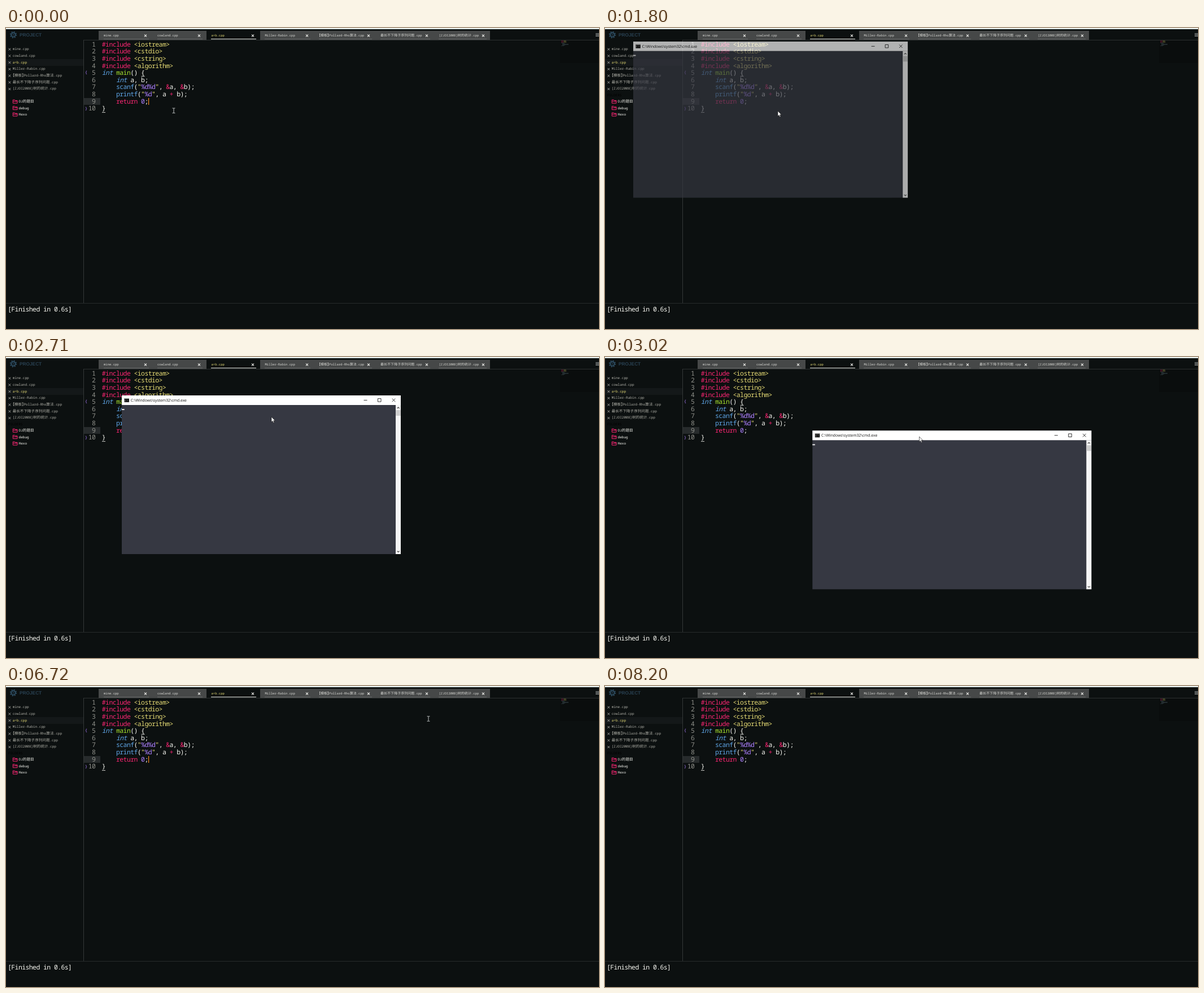
Write an HTML page that moves like this. It is 1050x533 px and loops after 8.3 s.

```html
<!DOCTYPE html>
<html lang="en">
<head>
<meta charset="utf-8">
<title>Editor and console</title>
<style>
html, body { margin: 0; width: 100%; height: 100%; overflow: hidden; background: #0c1010; }
svg { display: block; width: 1050px; height: 533px; }
text { white-space: pre; text-rendering: geometricPrecision; font-family: "Noto Sans Mono", "DejaVu Sans Mono", monospace; }
.cjk { font-family: "Noto Sans CJK SC", "Noto Sans CJK JP", sans-serif; font-feature-settings: "halt"; }
.code { font-size: 11.5px; font-weight: 500; letter-spacing: -.6px; }
.term { font-family: "Liberation Mono", monospace; }
.title { font-family: "Open Sans", "Noto Sans", sans-serif; }
.head { font-family: "Liberation Sans", sans-serif; font-weight: bold; }
</style>
</head>
<body>
<svg id="stage" viewBox="0 0 1050 533"></svg>
<script>
const LOOP = 8300;
const INK = { p: '#f92672', y: '#e6db74', b: '#5fa6e8', i: '#5fa6e8', g: '#a6e22e', w: '#f8f8f2', v: '#ae81ff' };

const esc = s => s.replace(/&/g, '&amp;').replace(/</g, '&lt;').replace(/>/g, '&gt;');
const rect = (x, y, w, h, fill, more = '') =>
  `<rect x="${x}" y="${y}" width="${w}" height="${h}" fill="${fill}" ${more}/>`;
const path = (d, stroke, width = 1, more = '') =>
  `<path d="${d}" fill="none" stroke="${stroke}" stroke-width="${width}" ${more}/>`;
const cross = (x, y, r, color, width) =>
  path(`M${x - r} ${y - r}l${2 * r} ${2 * r}m0 ${-2 * r}l${-2 * r} ${2 * r}`, color, width);

// Latin runs use the mono face, Chinese runs a slightly larger CJK face.
function label(x, y, str, size, fill, cls = '', ratio = 1.09) {
  const body = esc(str).replace(/[^\x00-\xff]+/g,
    run => `<tspan class="cjk" font-size="${size * ratio}">${run}</tspan>`);
  return `<text x="${x}" y="${y}" font-size="${size}" fill="${fill}" class="${cls}">${body}</text>`;
}

function topBar() {
  const tabs = [
    [173, 247, 'mine.cpp'], [268, 342, 'cowland.cpp'], [363.5, 437, 'a+b.cpp'],
    [458.5, 533, 'Miller-Rabin.cpp'], [554, 642, '【模板】Pollard-Rho算法.cpp'],
    [663, 745, '最长不下降子序列问题.cpp'], [766.5, 845, '[ZJOI2008]树的统计.cpp']
  ];
  return rect(0, 0, 1050, 2, '#eef5f3') + rect(0, 2, 1050, 1, '#1c2626') +
    rect(137, 21, 913, 1, '#2c3030') +
    rect(164, 5, 693, 16, '#464848') + rect(355, 4, 95, 17, '#0c1010') +
    tabs.map(([x, close, name], i) =>
      rect(Math.floor(x), 19, close + 6 - Math.floor(x), 1, i === 2 ? '#e8e8e4' : '#666868') +
      label(x, i < 4 ? 14.6 : 15.4, name, 5.55, i === 2 ? INK.y : '#d8d8d4') +
      cross(close, 13.6, 2, '#f0f0ec', 1.1)).join('') +
    path('M1044 10h6m-6 2.2h6m-6 2.2h6', '#a8acac', 1);
}

function sidebar() {
  const files = ['mine.cpp', 'cowland.cpp', 'a+b.cpp', 'Miller-Rabin.cpp',
    '【模板】Pollard-Rho算法.cpp', '最长不下降子序列问题.cpp', '[ZJOI2008]树的统计.cpp'];
  const folders = ['OJ的题目', 'debug', 'Hexo'];
  const gear = `<g transform="translate(13 12)">` +
    `<circle r="3.6" fill="none" stroke="#2c4a5e" stroke-width="2"/>` +
    `<circle r="5.2" fill="none" stroke="#2c4a5e" stroke-width="2" stroke-dasharray="2.04 2.04"/>` +
    `<circle r="1.1" fill="#2c4a5e"/></g>`;
  return gear + label(24, 15, 'PROJECT', 8.3, '#294152', 'head') +
    rect(0, 55, 137, 12, '#141819') +
    files.map((name, i) => {
      const y = 37.1 + i * 11.73;
      return cross(6.4, y + .6, 1.9, '#b4b4ae', .9) +
        label(11.7, y + 2, name, 6.05, i === 2 ? INK.y : '#b0b0a8');
    }).join('') +
    folders.map((name, i) => {
      const y = 130.2 + i * 11.4;
      return path(`M12.3 ${y + 3}v-6h3l1 1.2h3.7v4.8zm0 -3.4h7.7`, INK.p, 1) +
        label(22.6, y + 2, name, 6.05, INK.w);
    }).join('') +
    `<g id="folders">${label(4, 121, 'FOLDERS', 6.05, '#000')}</g>` +
    rect(137, 21, 1, 467, '#343838');
}

function code() {
  const lines = [
    'p|#include ~y|<iostream>', 'p|#include ~y|<cstdio>', 'p|#include ~y|<cstring>',
    'p|#include ~y|<algorithm>', 'i|int ~g|main~w|() {', 'i|    int ~w|a, b;',
    'b|    scanf~w|(~y|"~v|%d%d~y|"~w|, ~p|&~w|a, ~p|&~w|b);',
    'b|    printf~w|(~y|"~v|%d~y|"~w|, a ~p|+~w| b);',
    'p|    return ~v|0~w|;', 'w|}'
  ];
  const base = i => 32.7 + i * 12.62;
  const span = token => {
    const [key, str] = token.split('|');
    return `<tspan fill="${INK[key]}"${key === 'i' ? ' font-style="italic"' : ''}>${esc(str)}</tspan>`;
  };
  return rect(138, 124, 29, 12, '#272b2c') +
    lines.map((line, i) =>
      `<text class="code" x="${158.3 - 6.3 * String(i + 1).length}" y="${base(i)}" fill="#8f908a">${i + 1}</text>` +
      `<text class="code" x="169.8" y="${base(i)}">${line.split('~').map(span).join('')}</text>`).join('') +
    label(139.8, 81.4, '{', 7.5, INK.v) + label(139.8, 144.8, '}', 7.5, INK.v) +
    rect(239.5, 85, 6, 1, '#c8c8c4') + rect(170, 149, 6, 1, '#c8c8c4');
}

function minimap() {
  const ink = ['#6d1a36', '#6d6a38', '#3d4a50'];
  let out = rect(981, 22, 69, 40, '#0a0d0d');
  for (let i = 0; i < 10; i++) {
    out += rect(983 + (i > 4 && i < 9 ? 2 : 0), 22 + i, i < 4 ? 4 : 5, .7, ink[i < 4 ? 0 : 2], 'opacity=".7"');
    if (i < 4) out += rect(987.5, 22 + i, 4 + i % 2, .7, ink[1], 'opacity=".8"');
    if (i > 5 && i < 8) out += rect(990, 22 + i, 6, .7, ink[2], 'opacity=".7"');
  }
  return out;
}

function consoleWindow() {
  return `<g id="win">` +
    rect(0, 0, 494, 281, '#363842') + rect(0, 0, 494, 17, '#fff') +
    rect(4.5, 5, 8.5, 7, '#111') + rect(4.5, 5, 8.5, 1.3, '#9a9a9a') +
    label(5.2, 10.6, 'C:\\', 3.8, '#fff') +
    label(15.8, 11, 'C:\\Windows\\system32\\cmd.exe', 6.8, '#111', 'title') +
    path('M428.5 8.5h6', '#222', .9) + path('M453.4 5.6h5.6v5.6h-5.6z', '#222', .9) +
    cross(481.5, 8.4, 2.8, '#222', .9) +
    rect(485, 17, 9, 264, '#f6f6f6') + rect(485.3, 26, 8.4, 10, '#cdcdcd') +
    path('M487.6 23l2 -2l2 2M487.6 275.5l2 2l2 -2', '#444', 1.1) +
    `<g id="out"></g>` + rect(0, 24, 4.6, 2, '#e4e4e4', 'id="block"') + `</g>`;
}

const pointers =
  `<path id="arrow" d="M0 0v9.2l2.1 -1.9l1.4 3.1l1.5 -.7l-1.4 -3h2.8z" fill="#fff" stroke="#111" stroke-width=".6"/>` +
  path('M-2.4 -4.3h1.7l.7 .5l.7 -.5h1.7M0 -3.8v7.6M-2.4 4.3h1.7l.7 -.5l.7 .5h1.7', '#d8dcdc', .9, 'id="beam"');

document.getElementById('stage').innerHTML =
  rect(0, 0, 1050, 533, '#0c1010') + topBar() + sidebar() + code() + minimap() +
  rect(252, 124, 1.2, 12, '#fd8a1f', 'id="caret"') +
  rect(0, 487, 1050, 1, '#262a2b') +
  `<text id="done" class="code" x="3" y="501.7" fill="${INK.w}">[Finished in 0.6s]</text>` +
  consoleWindow() + pointers;

// Each table row: start time, then the values held until the next row.
const POINTER = [
  [0, 'beam', 297, 146.3], [150, 'beam', 301, 146.3], [290, 'beam', 304, 146.3], [700, 'beam', 306, 146.5],
  [1800, 'arrow', 306, 147], [2100, 'arrow', 262, 80], [2280, 'arrow', 237, 33], [2440, 'arrow', 314, 54],
  [2590, 'arrow', 383, 71], [2710, 'arrow', 470, 106], [2860, 'arrow', 538, 134], [3020, 'arrow', 556.5, 141],
  [3710, 'arrow', 592, 124], [3850, 'arrow', 690, 70], [3980, 'beam', 752, 46.3],
  [6710, 'beam', 748, 58], [6840, 'beam', 741, 81.4], [6990, 'beam', 755, 145], [7130, 'beam', 795, 250],
  [7280, 'beam', 850, 365], [7420, 'beam', 890, 460], [7540, 'beam', 940, 495],
  [7700, 'beam', 1005, 515], [7860, 'beam', 1035, 528], [8030, 'none', 0, 0]
];
const WINDOW = [ // x, y, scale, opacity
  [0, 0, 0, 1, 0], [1800, 50, 24, .984, .68], [1940, 46, 21.5, 1, 1], [2440, 70, 28, 1, 1],
  [2590, 125, 43, 1, 1], [2710, 205, 68, 1, 1], [2860, 325, 116, 1, 1], [3020, 367.3, 130.3, 1, 1],
  [3170, 368, 130.3, 1, 1], [6450, 380, 137, .952, .45], [6580, 0, 0, 1, 0]
];
const CARET = [[0, 1], [430, 0], [700, 1], [1210, 0], [6580, 1], [7130, 0], [7540, 1], [8030, 0]];
const BLOCK = [[0, 1], [2280, 0], [2710, 1], [3300, 0], [3850, 1], [4390, 0], [4840, 1], [5360, 0], [5860, 1]];
const DONE = [[0, 1], [1060, 0], [1640, 1]];
const FOLDERS = [[0, 0], [1640, 1]];
const TYPED = [[0, ''], [4110, '1'], [4260, '1 '], [4390, '1 2'], [4840, '1 2\n3请按任意键继续. . . ']];

const el = id => document.getElementById(id);
const at = (table, t) => table.findLast(row => row[0] <= t).slice(1);
const show = (id, value) => el(id).setAttribute('opacity', value);
let shown = '';

function draw(t) {
  const [kind, px, py] = at(POINTER, t);
  for (const id of ['arrow', 'beam']) {
    show(id, +(id === kind));
    el(id).setAttribute('transform', `translate(${px} ${py})`);
  }
  const [x, y, scale, alpha] = at(WINDOW, t);
  el('win').setAttribute('transform', `translate(${x} ${y}) scale(${scale})`);
  show('win', alpha);
  show('caret', at(CARET, t)[0]);
  show('block', at(BLOCK, t)[0]);
  show('done', at(DONE, t)[0]);
  show('folders', at(FOLDERS, t)[0]);

  const [typed] = at(TYPED, t);
  if (typed !== shown) {
    const rows = typed.split('\n');
    const cells = [...rows.at(-1)].reduce((n, c) => n + (c > '\xff' ? 2 : 1), 0);
    el('out').innerHTML = rows.map((row, i) => label(0, 24.7 + i * 8.8, row, 7.33, '#d0d0d0', 'term', 1.2)).join('');
    el('block').setAttribute('transform', `translate(${cells * 4.4} ${(rows.length - 1) * 8.8})`);
    shown = typed;
  }
}

const start = performance.now();
function tick() {
  draw((performance.now() - start) % LOOP);
  requestAnimationFrame(tick);
}
tick();
</script>
</body>
</html>
```
